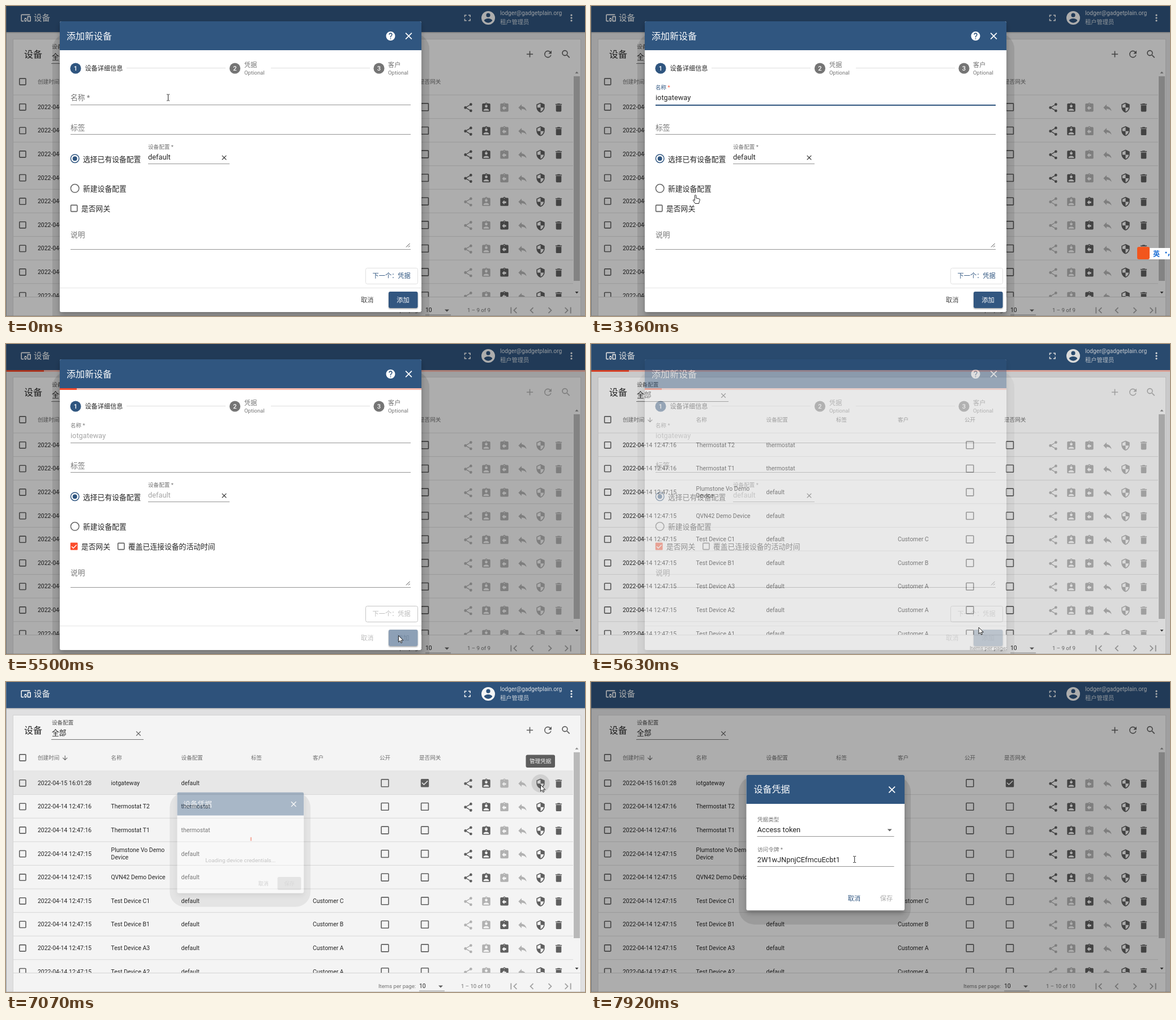
Write an HTML page that moves like this. It is 1023 by 547 pixels and loops after 8 s.

```html
<!DOCTYPE html>
<html lang="zh">
<head>
<meta charset="utf-8">
<style>
html, body { margin: 0; width: 100%; height: 100%; overflow: hidden; background: #eee; }
svg { display: block; width: 100vw; height: 100vh; font-family: Roboto, "Noto Sans CJK SC", "Noto Sans CJK", sans-serif; }
text { white-space: pre; }
.load .val { fill: #a6a6a6; }
.load .btn { fill: #bdbdbd; }
.load .edge { stroke: #c4c4c4; }
.load .add { fill: #8da0b6; }
.load .addText { fill: #74889f; }
</style>
</head>
<body>
<svg id="stage" viewBox="0 0 1023 547"></svg>
<script>
const BLUE = '#305680', DARK = '#262626', GRAY = '#757575', ICON = '#636363', OFF = '#b9b9b9', RED = '#fb4b2b';
const clip = 'M19 3h-4.2a3 3 0 0 0-5.6 0H5a2 2 0 0 0-2 2v14a2 2 0 0 0 2 2h14a2 2 0 0 0 2-2V5a2 2 0 0 0-2-2zM11 4a1 1 0 0 0 2 0 1 1 0 0 0-2 0z';
const ICONS = {
  devices: 'M3 6h18V4H3c-1.1 0-2 .9-2 2v12c0 1.1.9 2 2 2h4v-2H3V6zm10 6H9v1.78c-1.3 1.2-1.3 3.2 0 4.44V20h4v-1.78c1.3-1.2 1.3-3.2 0-4.44V12zm-2 5.5a1.5 1.5 0 1 1 0-3 1.5 1.5 0 0 1 0 3zM22 8h-6c-.5 0-1 .5-1 1v10c0 .5.5 1 1 1h6c.5 0 1-.5 1-1V9c0-.5-.5-1-1-1zm-1 10h-4v-8h4v8z',
  full: 'M7 14H5v5h5v-2H7v-3zm-2-4h2V7h3V5H5v5zm12 7h-3v2h5v-5h-2v3zM14 5v2h3v3h2V5h-5z',
  account: 'M12 2a10 10 0 1 0 0 20 10 10 0 0 0 0-20zm0 3a3 3 0 1 1 0 6 3 3 0 0 1 0-6zm0 14.2c-2.5 0-4.7-1.3-6-3.2 0-2 4-3.1 6-3.1s6 1.1 6 3.1c-1.3 1.9-3.5 3.2-6 3.2z',
  more: 'M10 6a2 2 0 1 0 4 0 2 2 0 0 0-4 0zm0 6a2 2 0 1 0 4 0 2 2 0 0 0-4 0zm0 6a2 2 0 1 0 4 0 2 2 0 0 0-4 0z',
  plus: 'M19 13h-6v6h-2v-6H5v-2h6V5h2v6h6v2z',
  refresh: 'M17.65 6.35A8 8 0 1 0 19.73 14h-2.08A6 6 0 1 1 12 6c1.66 0 3.14.69 4.22 1.78L13 11h7V4l-2.35 2.35z',
  search: 'M15.5 14h-.8l-.3-.3a6.5 6.5 0 1 0-.7.7l.3.3v.8l5 5 1.5-1.5-5-5zm-6 0a4.5 4.5 0 1 1 0-9 4.5 4.5 0 0 1 0 9z',
  share: 'M18 16.1c-.8 0-1.4.3-2 .8l-7.1-4.2q.2-.7 0-1.4L16 7.2a3 3 0 1 0-.9-1.5L8 9.8a3 3 0 1 0 0 4.4l7.2 4.2A2.9 2.9 0 1 0 18 16.1z',
  assign: clip + 'M12 6a3 3 0 1 0 0 6 3 3 0 0 0 0-6zM18 19H6v-1.4c0-2 4-3.1 6-3.1s6 1.1 6 3.1z',
  unassign: clip + 'M12 18l-5-5 5-5v3h4v4h-4z',
  reply: 'M10 9V5l-7 7 7 7v-4.1c5 0 8.5 1.6 11 5.1-1-5-4-10-11-11z',
  shield: 'M12 1L3 5v6c0 5.5 3.8 10.7 9 12 5.2-1.3 9-6.5 9-12V5l-9-4zm0 11h7c-.5 4.1-3.3 7.8-7 8.9V12H5V6.3l7-3.1V12z',
  trash: 'M6 19c0 1.1.9 2 2 2h8c1.1 0 2-.9 2-2V7H6v12zM19 4h-3.5l-1-1h-5l-1 1H5v2h14V4z',
  close: 'M19 6.4L17.6 5 12 10.6 6.4 5 5 6.4l5.6 5.6L5 17.6 6.4 19l5.6-5.6 5.6 5.6 1.4-1.4-5.6-5.6z',
  help: 'M12 2a10 10 0 1 0 0 20 10 10 0 0 0 0-20zm1 17h-2v-2h2v2zm2.1-7.8l-.9.9c-.8.8-1.2 1.4-1.2 2.9h-2v-.5c0-1.1.4-2.1 1.2-2.8l1.2-1.3a2 2 0 1 0-3.4-1.4H8a4 4 0 1 1 7.1 2.2z',
  sort: 'M20 12l-1.4-1.4-5.6 5.6V4h-2v12.2l-5.6-5.6L4 12l8 8z',
  empty: 'M19 5v14H5V5h14m0-2H5a2 2 0 0 0-2 2v14a2 2 0 0 0 2 2h14a2 2 0 0 0 2-2V5a2 2 0 0 0-2-2z',
  checked: 'M19 3H5a2 2 0 0 0-2 2v14a2 2 0 0 0 2 2h14a2 2 0 0 0 2-2V5a2 2 0 0 0-2-2zm-9 14l-5-5 1.4-1.4 3.6 3.6 7.6-7.6L19 8z',
  first: 'M18.4 16.6L13.8 12l4.6-4.6L17 6l-6 6 6 6zM6 6h2v12H6z',
  prev: 'M15.4 7.4L14 6l-6 6 6 6 1.4-1.4-4.6-4.6z',
  next: 'M10 6L8.6 7.4l4.6 4.6-4.6 4.6L10 18l6-6z',
  last: 'M5.6 7.4l4.6 4.6-4.6 4.6L7 18l6-6-6-6zM16 6h2v12h-2z',
  drop: 'M7 10l5 5 5-5z'
};

const rect = (x, y, w, h, fill, more = '') => `<rect x="${x}" y="${y}" width="${w}" height="${h}" fill="${fill}" ${more}/>`;
const text = (x, y, size, str, fill = DARK, more = '') => `<text x="${x}" y="${y}" font-size="${size}" fill="${fill}" ${more}>${str}</text>`;
const icon = (name, x, y, fill = ICON, size = 19.2) =>
  `<path d="${ICONS[name]}" fill="${fill}" fill-rule="evenodd" transform="translate(${x - size / 2} ${y - size / 2}) scale(${size / 24})"/>`;
const group = (id, body, more = '') => `<g id="${id}" ${more}>${body}</g>`;
const box = (x, y, color = ICON) => rect(x - 5.6, y - 5.6, 11.2, 11.2, 'none', `rx="1" stroke="${color}" stroke-width="1.6"`);
const rule = (x, y, w, color = '#949494') => rect(x, y, w, 1, color);
const ring = (x, y, color) => `<circle cx="${x}" cy="${y}" r="7.3" fill="none" stroke="${color}" stroke-width="1.5"/>`;
const bold = 'font-weight="500"';

const ROW = 41.6, TOP = 157.2;
const devices = [
  ['Thermostat T2', 'thermostat', '', 16], ['Thermostat T1', 'thermostat', '', 16],
  ['Plumstone Vo Demo|Device', 'default', '', 15], ['QVN42 Demo Device', 'default', '', 15],
  ...['C1', 'B1', 'A3', 'A2', 'A1'].map(n => ['Test Device ' + n, 'default', 'Customer ' + n[0], 15])
];
const gateway = ['iotgateway', 'default', '', 0];

function row([name, profile, customer, sec], i) {
  const y = TOP + ROW * (i + .5), base = y + 3.7, lines = name.split('|');
  const date = sec ? '2022-04-14 12:47:' + sec : '2022-04-15 16:01:28';
  return rule(13, TOP + ROW * (i + 1) - .7, 989, '#e1e1e1') + box(29.4, y + .3) +
    text(56, base, 10.4, date) +
    lines.map((s, k) => text(185.6, base + (k - (lines.length - 1) / 2) * 12.4, 10.4, s)).join('') +
    text(309.6, base, 10.4, profile) + text(542, base, 10.4, customer) +
    icon('empty', 669.5, y + .3) + icon(sec ? 'empty' : 'checked', 740, y + .3);
}

function actions(list, disabled) {
  const tools = ['plus', 'refresh', 'search'].map((n, k) => icon(n, 925.5 + k * 32, 85, disabled ? OFF : ICON)).join('');
  return tools + '<g clip-path="url(#body)">' + list.map(([, , customer], i) => {
    const on = [!customer, !customer, customer, false, true, true];
    return ['share', 'assign', 'unassign', 'reply', 'shield', 'trash']
      .map((n, k) => icon(n, 816.5 + k * 32, TOP + ROW * (i + .5) + 1.2, on[k] && !disabled ? ICON : OFF)).join('');
  }).join('') + '</g>';
}

function table(list, dx, count, thumb) {
  return '<g clip-path="url(#body)">' + list.map(row).join('') + '</g>' +
    rect(1003, 124, 11, thumb, '#c1c1c1') +
    text(658 + dx, 540, 9.6, 'Items per page:', GRAY) + text(730 + dx, 540, 10.4, '10') +
    icon('drop', 768 + dx, 537, ICON, 19.2) + rule(730 + dx, 544.5, 45, '#999') +
    text(804 + dx, 540, 9.6, count, GRAY);
}

const all = [gateway, ...devices].slice(0, 9);
const columns = [[56, '创建时间'], [185.6, '名称'], [309.6, '设备配置'], [433, '标签'], [542, '客户'], [660, '公开'], [730, '是否网关']];
const page = rect(0, 0, 1023, 547, '#eaeaeb') +
  rect(12.5, 58.5, 1003, 500, '#fff', 'stroke="#dcdcdc"') +
  rect(0, 46, 1023, 2, '#000', 'opacity=".14"') + rect(0, 0, 1023, 46, BLUE) +
  icon('devices', 35.2, 21, '#fff') + text(49, 26, 14.4, '设备', '#fff', bold) +
  icon('full', 815.3, 21, '#fff') + icon('account', 852, 21, '#fff', 28.8) +
  text(873, 16.3, 10.24, 'lodger@gadgetplain.org', '#e4e9ee') + text(873, 31.5, 10.24, '租户管理员', '#d3dbe3') +
  icon('more', 999, 21, '#fff') +
  text(32, 91, 16, '设备') + text(81, 75, 9.6, '设备配置', '#555') + text(81, 94.3, 12.8, '全部') +
  icon('close', 234, 91, ICON, 14.4) + rule(80, 101, 163, '#777') +
  box(29.4, 133.5) + columns.map(([x, s]) => text(x, 137.2, 9.6, s, GRAY)).join('') + icon('sort', 104.3, 134, ICON, 13) +
  rule(13, 156.5, 989, '#e1e1e1') + rect(13, 0, 989, ROW, '#f1f1f1', 'id="hover"') +
  group('oldTable', table(devices, 11, '1 – 9 of 9', 361)) +
  group('newTable', table(all, 0, '1 – 10 of 10', 328)) +
  group('oldAct', actions(devices)) + group('offAct', actions(devices, true)) +
  '<circle id="halo" cx="944.5" cy="179" r="16" opacity=".1"/>' + group('newAct', actions(all)) +
  rule(13, 513, 1002, '#ddd') +
  '<path d="M1005.5 119h6l-3-3.4z" fill="#999"/><path d="M1005.5 504h6l-3 3.4z" fill="#444"/>' +
  ['first', 'prev', 'next', 'last'].map((n, k) => icon(n, 897 + k * 32, 537, '#aaa', 22.4)).join('') +
  group('pageBar', rect(0, 46, 1023, 3, '#fcb9ac') + rect(0, 46, 67, 3, RED, 'id="pageFill"')) +
  rect(0, 0, 1, 547, '#8793a3', 'opacity=".7"') + rect(0, 546, 1023, 1, '#aaa', 'opacity=".5"');

const step = (x, n, color) => `<circle cx="${x}" cy="110" r="9.6" fill="${color}"/>` +
  text(x, 114, 11.2, n, '#fff', `text-anchor="middle" ${bold}`);
const optional = (x, s) => text(x, 108.2, 11.2, s, GRAY) + text(x, 121, 9.6, 'Optional', GRAY);

const addDialog = rect(82, 48, 666, 530, '#000', 'rx="28" opacity=".1"') +
  rect(95, 27, 639, 513, '#fff', 'rx="3" filter="url(#soft)"') +
  `<path d="M95 78V30q0-3 3-3h633q3 0 3 3v48z" fill="${BLUE}"/>` +
  text(107, 58.7, 16, '添加新设备', '#fff', bold) + icon('help', 679.5, 53, '#fff') + icon('close', 711.5, 53, '#fff', 20.5) +
  group('dialogBar', rect(95, 78, 639, 3, '#fcb9ac') + rect(95, 78, 30, 3, RED, 'id="dialogFill"')) +
  step(123, 1, BLUE) + text(139.4, 114.2, 11.2, '设备详细信息') + rule(213, 109, 175, '#dedede') +
  step(404.5, 2, GRAY) + optional(421, '凭据') + rule(468, 109, 175, '#dedede') +
  step(659, 3, GRAY) + optional(675, '客户') +
  group('label', text(0, 0, 12.8, '名称<tspan id="star"> *</tspan>', null)) +
  rule(114, 174, 601) + rect(114, 174, 601, 2, BLUE, 'id="focus"') +
  text(114, 166, 12.8, '', DARK, 'id="name" class="val"') + rect(0, 155, 1, 14, '#222', 'id="caret"') +
  text(114, 218.6, 12.8, '标签', GRAY) + rule(114, 226, 601) +
  ring(121.7, 269.2, BLUE) + `<circle cx="121.7" cy="269.2" r="4" fill="${BLUE}"/>` + text(136, 274.7, 12.8, '选择已有设备配置') +
  text(251, 251.6, 9.6, '设备配置 *', GRAY) + text(251, 271, 12.8, 'default', DARK, 'class="val"') +
  icon('close', 385.5, 267.6, '#333', 14.4) + rule(251, 278, 144) +
  ring(121.7, 321.8, '#666') + text(136, 327.4, 12.8, '新建设备配置') +
  group('unticked', box(120.2, 357)) +
  group('ticked', rect(113.8, 350.6, 12.8, 12.8, RED, 'rx="1"') +
    '<path d="M116 357.2l3 3 5.6-5.8" fill="none" stroke="#fff" stroke-width="1.5"/>' +
    box(203.4, 357) + text(216, 361.8, 12.8, '覆盖已连接设备的活动时间')) +
  text(133, 361.8, 12.8, '是否网关') +
  text(114, 408.3, 12.8, '说明', GRAY) + rule(114, 429, 601) +
  '<path d="M707 425.5l6.500-6.500M711 425.500l2.500-2.500" stroke="#444"/>' +
  rect(635.5, 462.5, 92, 28, '#fff', 'rx="3" stroke="#e0e0e0" class="edge"') +
  text(647.6, 480.4, 11.2, '下一个：凭据', BLUE, `class="btn" ${bold}`) +
  rule(95, 497, 639, '#e6e6e6') + text(627, 522.7, 11.2, '取消', '#444', 'class="btn"') +
  rect(676, 504, 51.5, 29, BLUE, 'rx="3" class="add" filter="url(#lift)"') +
  text(690.2, 522.7, 11.2, '添加', '#fff', `class="addText" ${bold}`);

const panel = (y, h) => rect(274.5, y, 279.5, h, '#fff', 'rx="3" filter="url(#soft)"') +
  `<path d="M274.5 ${y + 51}v-48q0-3 3-3h273.500q3 0 3 3v48z" fill="${BLUE}"/>` +
  text(287.6, y + 31.2, 16, '设备凭据', '#fff', bold) + icon('close', 531.7, y + 26, '#fff', 20.5);

const loading = rect(258, 173, 311, 252, '#000', 'rx="33" opacity=".17"') + panel(172.6, 222) +
  rect(436, 271.500, 3, 8, RED) + text(414.4, 327, 12.3, 'Loading device credentials...', GRAY, 'text-anchor="middle"') +
  text(453.5, 378.500, 11.2, '取消', '#999') + rect(496, 359, 52, 29, '#ccc', 'rx="3"') + text(511, 378, 11.2, '保存', '#aaa');

const credentials = rect(261, 166, 304, 262, '#000', 'rx="28" opacity=".1"') + panel(164, 239) +
  text(294, 246.2, 9.6, '凭据类型', GRAY) + text(293.7, 265.3, 12.8, 'Access token') +
  icon('drop', 527.7, 261, ICON) + rule(293.5, 272, 242) +
  text(294, 298.600, 9.6, '访问令牌 *', GRAY) + text(293.7, 317.800, 12.8, '2W1wJNpnjCEfmcuEcbt1') + rule(293.5, 325, 242) +
  text(453.7, 386.2, 11.2, '取消', BLUE, bold) + text(510.7, 386.2, 11.2, '保存', '#ababab', bold);

const ime = rect(976, 427, 60, 20, '#fff') + rect(965, 425, 22, 22, '#f2561d', 'rx="3"') +
  text(993, 441.700, 12, '英', '#1d6fd6', 'font-weight="700"') +
  '<circle cx="1016" cy="435" r="1.600" fill="#1d6fd6"/><path d="M1020 437.500h2.500l-1.500 4h-1.500z" fill="#1d6fd6"/>';

const tip = rect(918.5, 128.5, 51.5, 22.5, '#616161', 'rx="3"') + text(925, 143.4, 9.6, '管理凭据', '#fff');

const pointers =
  group('beam', '<path d="M-2.500-5.500H-.8L0-4.800.8-5.500H2.500M0-4.800V4.800M-2.500 5.500H-.8L0 4.800.8 5.500H2.500" fill="none" stroke="#222"/>') +
  group('arrow', '<path d="M0 0V11.500L2.700 9 4.500 13 6.300 12.200 4.600 8.400H8.300Z" fill="#fff" stroke="#111" stroke-width=".9"/>') +
  group('hand', '<path d="M-1.300 1.300a1.300 1.300 0 0 1 2.600 0V5.500l5 1q1.800.5 1.500 2.500L6.800 12 6 15H-.5L-4 9.800q-.6-1.500.9-1.500l1.800 1.500z" fill="#fff" stroke="#111" stroke-width=".9"/>');

const stage = document.getElementById('stage');
stage.innerHTML = `<defs>
  <clipPath id="body"><rect x="13" y="157" width="1002" height="356"/></clipPath>
  <filter id="soft"><feDropShadow dx="0" dy="5" stdDeviation="5" flood-opacity=".25"/></filter>
  <filter id="lift"><feDropShadow dx="0" dy="1.5" stdDeviation="1.2" flood-opacity=".35"/></filter>
  </defs>` + page + group('tip', tip) + rect(0, 0, 1023, 547, '#000', 'id="shade"') +
  group('add', addDialog) +
  group('loading', loading, 'opacity=".38" transform="translate(414.4 283.5) scale(.8) translate(-414.4 -283.5)"') +
  group('cred', credentials) + group('ime', ime) + pointers;

const el = {};
stage.querySelectorAll('[id]').forEach(e => el[e.id] = e);
const set = (id, name, value) => el[id].setAttribute(name, value);
const show = (id, on) => { el[id].style.display = on ? '' : 'none'; };
const at = (list, t) => list.filter(k => k[0] <= t).pop();

// time, x, y, pointer
const moves = [
  [0, 286.5, 161.5, 'beam'], [3080, 272, 190, 'arrow'], [3220, 232, 272, 'arrow'], [3360, 184.5, 333.5, 'hand'],
  [3510, 128, 352, 'hand'], [3650, 117, 353, 'hand'], [3940, 205, 362, 'hand'], [4090, 305, 373, 'arrow'],
  [4210, 375, 402, 'arrow'], [4350, 470, 440, 'arrow'], [4490, 565, 478, 'arrow'], [4630, 638, 503, 'arrow'],
  [4770, 682, 513, 'hand'], [4920, 694, 515, 'hand'], [5350, 693.5, 514.5, 'arrow'], [5630, 685, 500, 'arrow'],
  [5780, 659.5, 465.5, 'arrow'], [5930, 675, 440, 'arrow'], [6070, 745, 370, 'arrow'], [6230, 835, 285, 'arrow'],
  [6390, 915, 215, 'arrow'], [6520, 944.5, 181.5, 'arrow'], [7220, 850, 200, 'arrow'], [7360, 660, 235, 'arrow'],
  [7500, 541, 258, 'arrow'], [7640, 505, 285, 'arrow'], [7780, 478, 305, 'beam'], [7920, 465.7, 313, 'beam']
];
const typed = [[0, 0], [1010, 1], [1170, 2], [1320, 3], [1470, 4], [1620, 5], [1900, 7], [2360, 9], [2490, 10]];
const shades = [[0, .32], [5630, .14], [5780, 0], [7070, .045], [7220, .32]];

function render(t) {
  const busy = t >= 5350 && t < 5780, added = t >= 5780, open = t < 5780;
  const focused = t >= 150 && t < 3650;
  const [, x, y, kind] = at(moves, t);

  show('oldTable', !added); show('newTable', added);
  show('oldAct', t < 5350); show('offAct', busy); show('newAct', added);
  const index = Math.floor((y - TOP) / ROW);
  const over = t >= 7220 ? 0 : index;
  show('hover', t >= 5930 && t < 7360 && over >= 0);
  set('hover', 'y', TOP + Math.max(over, 0) * ROW);
  show('halo', t >= 6520 && t < 7220);
  show('tip', t >= 6660 && t < 7220);
  show('pageBar', busy); show('dialogBar', busy);
  const fill = t < 5500 ? .3 : 1;
  set('pageFill', 'width', 67 * fill); set('dialogFill', 'width', 30 * fill);
  set('shade', 'opacity', at(shades, t)[1]);

  show('add', open);
  set('add', 'class', busy ? 'load' : '');
  set('add', 'opacity', t < 5630 ? 1 : .4);
  const sample = Math.floor((t - 150) / 140) * 140 + 90;
  const p = t < 150 ? 0 : 1 - (1 - Math.min(1, sample / 400)) ** 3;
  set('label', 'transform', `translate(114 ${166 - 19 * p}) scale(${1 - .25 * p})`);
  set('label', 'fill', focused ? BLUE : GRAY);
  set('star', 'fill', focused ? RED : GRAY);
  show('focus', focused);
  set('focus', 'x', 414.5 - 300.5 * p); set('focus', 'width', 601 * p);
  el.name.textContent = 'iotgateway'.slice(0, at(typed, t)[1]);
  show('caret', (t >= 290 && t < 710) || (t >= 1010 && t < 3080));
  set('caret', 'x', 114.2 + (open ? el.name.getComputedTextLength() : 0));
  show('unticked', t < 3650); show('ticked', t >= 3650);
  show('ime', t >= 430 && t < 3800);

  show('loading', t >= 7070 && t < 7220);
  show('cred', t >= 7220);
  for (const id of ['beam', 'arrow', 'hand']) show(id, id === kind);
  set(kind, 'transform', `translate(${x} ${y})`);
}

const start = performance.now();
function tick() {
  render((performance.now() - start) % 8000);
  requestAnimationFrame(tick);
}
tick();
</script>
</body>
</html>
```
